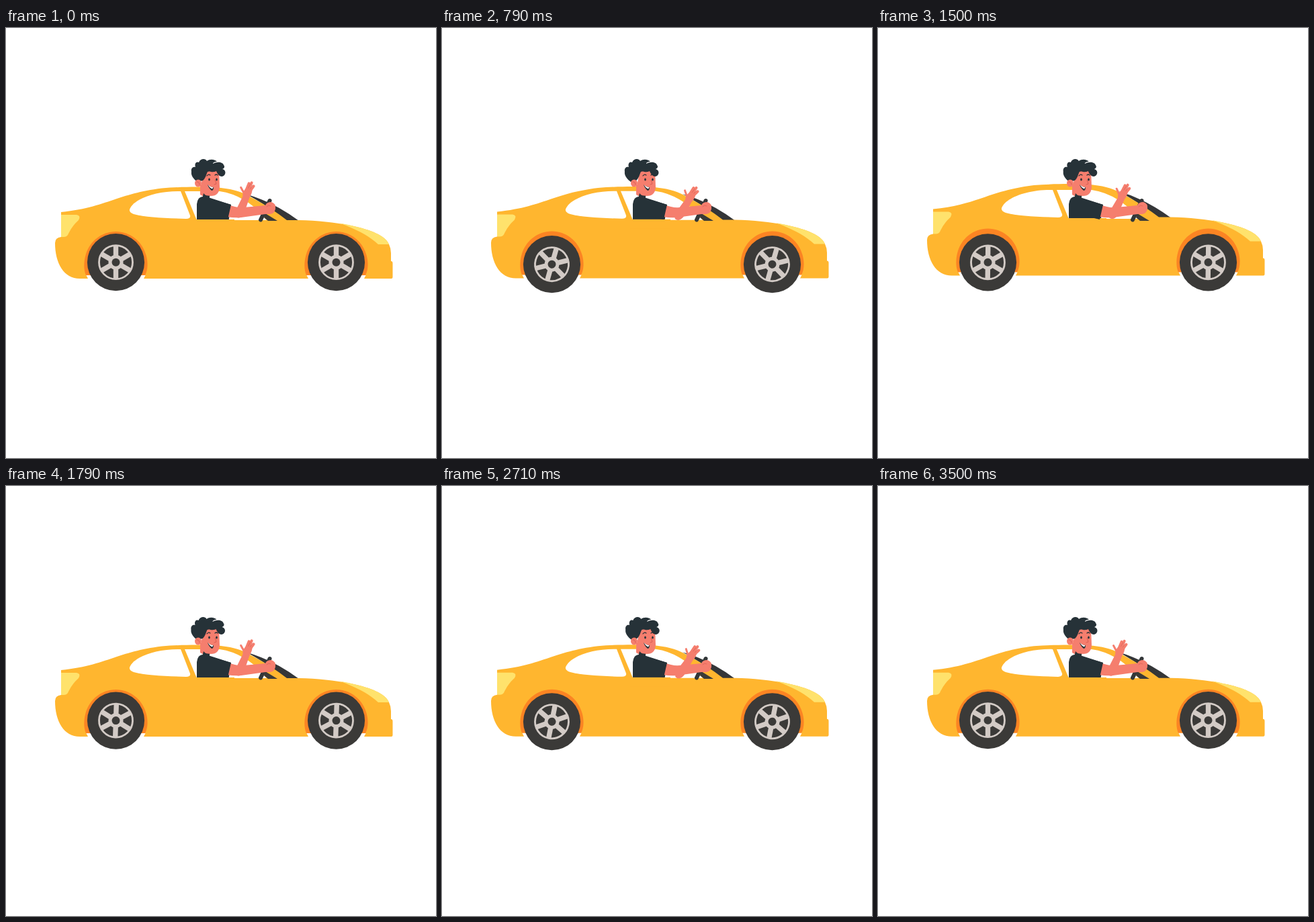
Animation of 640x640 px, one loop 3570 ms. Source, as an HTML page:

```html
<!DOCTYPE html>
<html lang="en">
<head>
<meta charset="utf-8">
<title>Waving driver</title>
<style>
  html, body { margin: 0; width: 100%; height: 100%; overflow: hidden; background: #fff; }
  svg { display: block; width: 100%; height: 100%; }
  .yellow { fill: #ffb62f; }
  .lamp { fill: #ffe26c; }
  .dark { fill: #263238; }
  .tyre { fill: #3b3a38; }
  .skin { fill: #f57e6e; }
  .rim { fill: #d3cbc6; }
  .line { fill: none; stroke: #263238; stroke-linecap: round; }
  .finger { fill: none; stroke: #f57e6e; stroke-linecap: round; stroke-width: 4; }
  .crease { fill: none; stroke: #d95f55; stroke-linecap: round; }
</style>
</head>
<body>
<svg viewBox="0 0 640 640">
  <defs>
    <g id="arch">
      <path fill="#fc8423" d="M-44.500 18C-48 10-48-2-45-12C-39-33-21-47 0-47S39-33 45-12C48-2 48 10 43.500 18Z"/>
      <path fill="#fff" d="M-44 18H44L41 24H-41Z"/>
    </g>
    <rect id="spoke" class="rim" x="-3.700" y="-25" width="7.400" height="50"/>
    <g id="wheel">
      <circle class="tyre" r="42.600"/>
      <g class="spin">
        <circle r="25" fill="none" stroke="#d3cbc6" stroke-width="2.800"/>
        <use href="#spoke"/>
        <use href="#spoke" transform="rotate(60)"/>
        <use href="#spoke" transform="rotate(120)"/>
        <circle class="rim" r="11"/>
        <circle class="tyre" r="6"/>
      </g>
    </g>
  </defs>

  <g class="car">
    <path fill="#343638" d="M358 247.500Q398 259 436 287H416Q392 266 358 247.500Z"/>
    <path class="yellow" d="M82 274C150 267 164 247 232 238.500C265 236 300 236 320 238C340 240 353 245 363 251Q392 266 418 286H436C468 286.500 500 291 520 295.500C548 302 566 311 570 322Q573 328 573 335V347Q575.500 347 575.500 350V371Q575.500 373 573.500 373H110C86 373 73 350 73 320Q73 312 82 311Z"/>
    <path class="lamp" d="M82 278H105Q112 279 108 286C100 293 96 300 92 308Q90 311 86 311H82Z"/>
    <path class="lamp" d="M497 290.500Q509 292.500 520 295.500C548 302 566 311 570 322H554C540 309 520 299 497 290.500Z"/>
    <use href="#arch" x="163.500" y="350"/>
    <use href="#arch" x="491.500" y="350"/>
  </g>

  <g class="glass" fill="#fff">
    <path d="M184 270C190 254 224 242 260 243L274 279Q275 284 268 284C235 283 208 282 190 277Q183 274 184 270Z"/>
    <path d="M266 243H318Q346 247 370 267L388 286H284Z"/>
  </g>

  <g transform="translate(163.500 348.700)"><g class="bob"><use href="#wheel"/></g></g>
  <g transform="translate(491.500 348.700)"><g class="bob"><use href="#wheel"/></g></g>

  <path class="dark" d="M284 290V262Q285 251 294 251L304 253L335 263L331 290Z"/>
  <path class="skin" d="M289 233H304V250Q298 254 289 248Z"/>
  <path class="dark" d="M294 246Q298 251 303 249V254H292Z"/>
  <path class="skin" d="M294 214Q304 208 317 212L318 237Q317 250 305 250Q293 249 290 236Z"/>
  <path id="hair" class="dark" d="M285 229C279 225 275 219 276 214C275 209 278 206 282 207C280 201 284 198 287 200C289 195 296 193 299 198C304 194 312 196 314 199C309 199 308 201 308 202C315 198 323 200 324 204C326 206 325 209 322 210C327 211 328 217 324 220C319 223 315 218 313 213C307 216 303 212 300 214C298 218 297 224 293 227Z"/>
  <ellipse class="skin" cx="286" cy="231" rx="5" ry="5.500"/>
  <path class="crease" d="M284 229Q288 229 288 233M311 226L313 232L310 233"/>
  <path class="line" stroke-width="1.200" d="M299 220Q301 217 304 219M311 219Q313 217 315 219"/>
  <ellipse class="dark" cx="302.500" cy="225.500" rx="1.300" ry="2"/>
  <ellipse class="dark" cx="313.500" cy="225.500" rx="1.300" ry="2"/>
  <path class="dark" d="M300 233Q304 237 309 237Q309 242 306 242Q302 239 300 233Z"/>
  <path fill="#fff" d="M300.500 233Q304 237 308.500 237L307 239.500Q303 238 300.500 233Z"/>

  <g class="glass"><rect class="yellow" x="280" y="285" width="60" height="14"/></g>

  <path class="tyre" d="M386 276L404 287H390L384 282Z"/>
  <path class="line" style="stroke:#333739" stroke-width="6" d="M392.500 257L379 285.500"/>
  <g id="wave">
    <path class="skin" d="M340 275L352 250Q351 243 357 238L366 239Q366 246 362 252L354 276Q349 285 342 281Z"/>
    <path class="finger" style="stroke-width:3" d="M354 246L349 237"/>
    <path class="finger" d="M357 241L361 231M360 241L365 230M363 242L368 235"/>
    <path class="crease" stroke-width=".7" d="M360 238L363 232M363 239L366 234"/>
  </g>
  <path class="skin" d="M331 263Q343 268 354 267L386 264Q388 259 395 259Q402 261 401 269Q400 276 393 277L386 277L350 282Q340 283 329 281Z"/>
  <path class="crease" stroke-width=".7" d="M388 266Q390 263 394 265"/>
  <path class="dark" d="M308 255L335 263L330 285Q320 282 308 281Z"/>
</svg>
<script>
  const LOOP = 3570, FRAMES = 50;
  const move = (s, value) =>
    document.querySelectorAll(s).forEach(el => el.setAttribute("transform", value));
  // 0 at the start of each period, 1 halfway
  const swing = (k, period) => (1 - Math.cos(2 * Math.PI * k / period)) / 2;

  function draw(now) {
    const k = Math.floor(now % LOOP / LOOP * FRAMES + 0.1) % FRAMES;
    const lift = -7.2 * swing(k + 0.4, 12.5);
    const bob = swing(Math.min(k, 45), 22.5);
    const wave = swing(k - 1.6, 25);
    move(".car", `translate(0 ${lift})`);
    move(".glass", `translate(0 ${0.45 * lift})`);
    move(".bob", `translate(0 ${3 * bob})`);
    move(".spin", `rotate(${16 * bob})`);
    move("#hair", `translate(${-4 * bob} 0)`);
    move("#wave", `translate(${6.5 * wave} ${4.5 * wave}) rotate(${12 * wave} 347 276)`);
  }

  const start = performance.now();
  function tick() {
    draw(performance.now() - start);
    requestAnimationFrame(tick);
  }
  tick();
</script>
</body>
</html>
```
